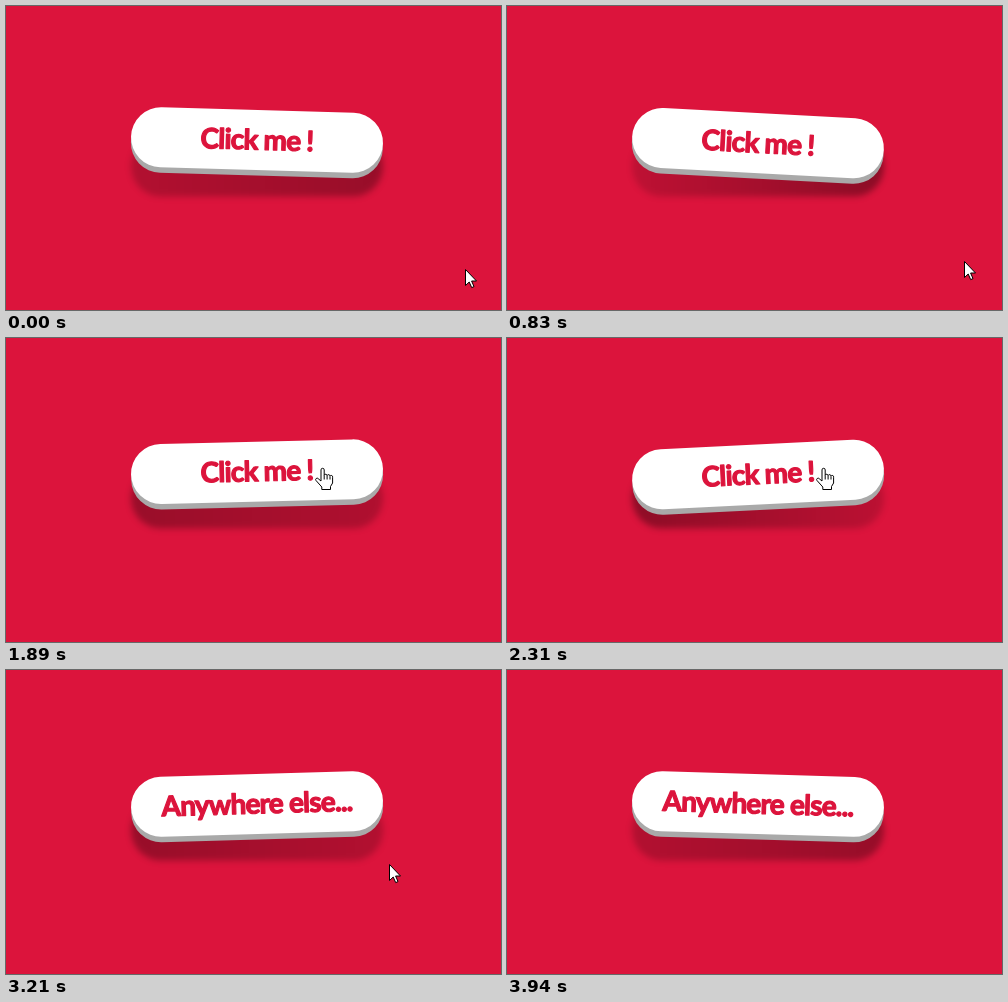
These frames come from a looping animation (495 px wide and 304 px high, 4.04 s). An HTML page with a canvas:

```html
<!DOCTYPE html>
<html lang="en">
<head>
<meta charset="utf-8">
<title>Swinging button</title>
<style>
  html, body { margin: 0; width: 100%; height: 100%; overflow: hidden; background: #dc143c; }
  canvas { display: block; }
</style>
</head>
<body>
<canvas id="stage" width="495" height="304"></canvas>
<script>
const ctx = document.getElementById('stage').getContext('2d');
const RED = '#dc143c';
const LOOP = 4040, STEPS = 30, STEP = LOOP / STEPS;
const SWING = 3900, PEAK = 640, TILT = 3.2 * Math.PI / 180;
const CX = 251, WIDTH = 252, HEIGHT = 60, SIDE = 5.5;
const CLICK = 2400, HAND_FROM = 1600, HAND_TO = 3000, POINTER_END = 3300;

// Where the pointer turns or changes speed
const TRAIL = [
  { at: 680, x: 459, y: 263 },
  { at: 810, x: 457, y: 255 },
  { at: 1210, x: 424, y: 171 },
  { at: 1700, x: 315, y: 130 },
  { at: 3000, x: 315, y: 130 },
  { at: 3230, x: 383, y: 194 },
];

const arrow = new Path2D('M.5 .5V16.5L4.2 13L6.7 18.6L9 17.6L6.6 12H11.5Z');
const hand = new Path2D('M6 13V1.9a1.6 1.6 0 0 1 3.2 0V7.2a1.5 1.5 0 0 1 2.9 .4a1.5 1.5 0 0 1 2.9 .6' +
  'a1.4 1.4 0 0 1 2.6 1V15L15.5 18.5V21.5H6.8V19L1 12.5a1.4 1.4 0 0 1 2.2-1.8Z');
const knuckles = new Path2D('M9.2 7.2V11.5M12.1 7.8V11.5M15 8.4V11.5');

function pill(y, fill) {
  ctx.fillStyle = fill;
  ctx.beginPath();
  ctx.roundRect(-WIDTH / 2, y - HEIGHT / 2, WIDTH, HEIGHT, HEIGHT / 2);
  ctx.fill();
}

// The lower end of the button casts the darker shadow.
function drawShadow(swing) {
  const shade = ctx.createLinearGradient(-WIDTH / 2, 0, WIDTH / 2, 0);
  shade.addColorStop(0, `rgba(0,0,0,${0.25 - 0.12 * swing})`);
  shade.addColorStop(1, `rgba(0,0,0,${0.25 + 0.12 * swing})`);
  ctx.save();
  ctx.translate(CX, 160.5);
  ctx.filter = 'blur(3px)';
  pill(0, shade);
  ctx.restore();
}

function drawButton(swing, label) {
  ctx.save();
  ctx.translate(CX, 132.8 + 4.7 * swing * swing);
  ctx.rotate(TILT * swing);
  pill(SIDE, '#a9a9a9');
  pill(0, '#fff');
  ctx.font = '700 28px Lato, sans-serif';
  ctx.letterSpacing = '-0.8px';
  ctx.textAlign = 'center';
  ctx.fillStyle = ctx.strokeStyle = RED;
  ctx.lineWidth = 1.2;
  ctx.lineJoin = 'round';
  ctx.fillText(label, 0, 9.5);
  ctx.strokeText(label, 0, 9.5);
  ctx.restore();
}

function pointerAt(t) {
  const next = TRAIL.findIndex(p => p.at >= t);
  if (next === 0) return TRAIL[0];
  if (next < 0) return TRAIL.at(-1);
  const a = TRAIL[next - 1], b = TRAIL[next];
  const f = (t - a.at) / (b.at - a.at);
  return { x: Math.round(a.x + (b.x - a.x) * f), y: Math.round(a.y + (b.y - a.y) * f) };
}

function drawPointer(t) {
  if (t > POINTER_END) return;
  const { x, y } = pointerAt(t);
  const isHand = t > HAND_FROM && t < HAND_TO;
  const shape = isHand ? hand : arrow;
  ctx.save();
  ctx.translate(isHand ? x - 6 : x, y);
  ctx.fillStyle = '#fff';
  ctx.strokeStyle = '#000';
  ctx.lineWidth = 1;
  ctx.fill(shape);
  ctx.stroke(shape);
  if (isHand) ctx.stroke(knuckles);
  ctx.restore();
}

// The picture moves in even steps, like a screen recording.
function stepTime(now) {
  const step = Math.floor((now % LOOP + 25) / STEP);
  return Math.min(step, STEPS - 1) * STEP;
}

function draw(now) {
  const t = stepTime(now);
  const swing = Math.cos(2 * Math.PI * (t - PEAK) / SWING);
  ctx.fillStyle = RED;
  ctx.fillRect(0, 0, 495, 304);
  drawShadow(swing);
  drawButton(swing, t < CLICK ? 'Click me !' : 'Anywhere else...');
  drawPointer(t);
}

const start = performance.now();
function tick() {
  draw(performance.now() - start);
  requestAnimationFrame(tick);
}
tick();
</script>
</body>
</html>
```
